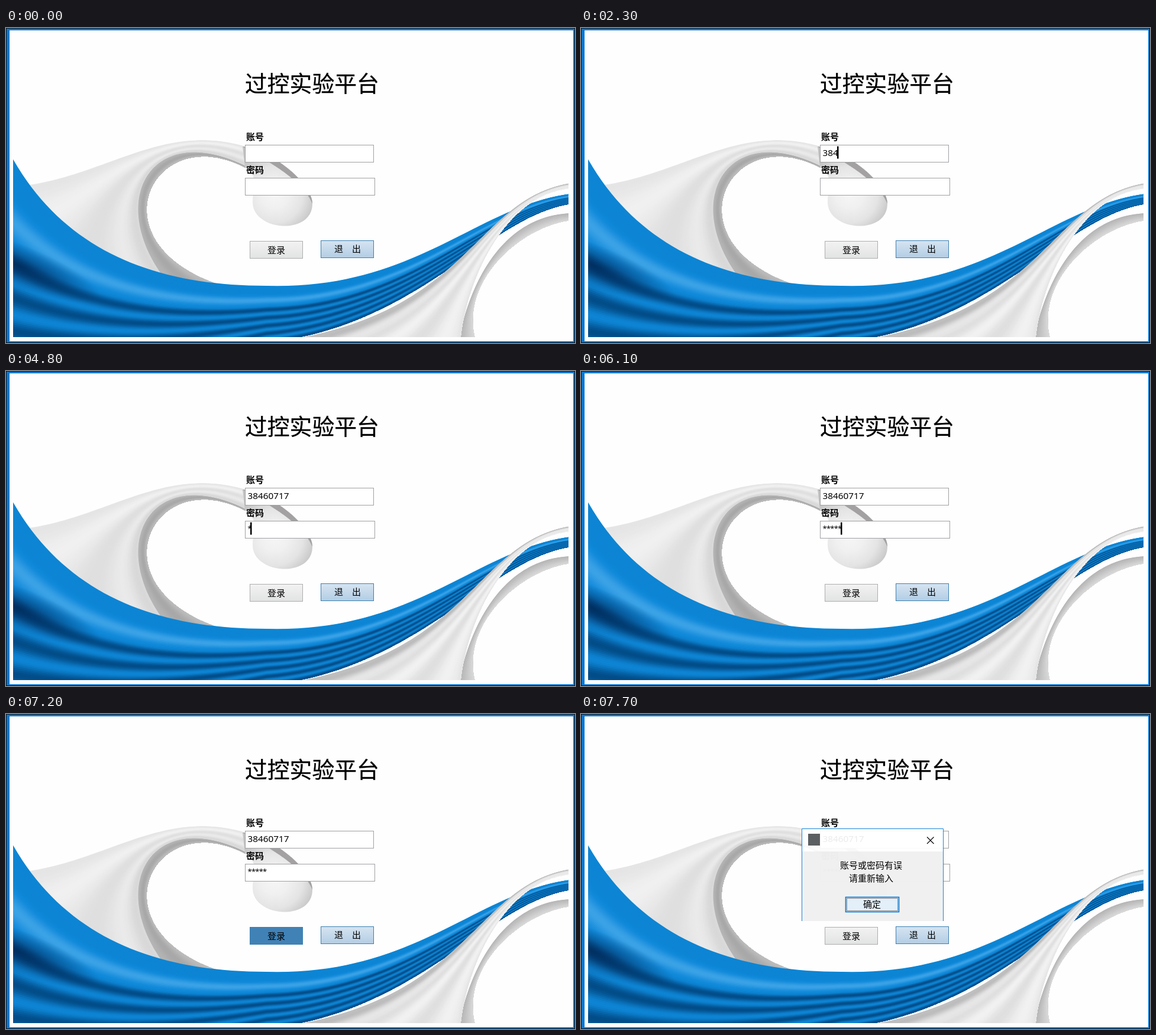
Write an HTML page with a canvas that moves like this. It is 962x534 px and loops after 8000 ms.

```html
<!DOCTYPE html>
<html lang="zh-CN">
<head>
<meta charset="utf-8">
<title>登录</title>
<style>
  html, body { margin: 0; width: 100%; height: 100%; overflow: hidden; background: #fff; }
  canvas, svg { position: absolute; left: 0; top: 0; width: 962px; height: 534px; }
  text { font: 15px "Noto Sans CJK SC", "Noto Sans CJK", sans-serif; fill: #000; }
  .title { font-size: 37.8px; font-weight: 300; stroke: #000; stroke-width: .3px; }
  .label { font-weight: 700; }
  .mid { text-anchor: middle; }
  .field { fill: #fff; stroke: #a0a0a4; }
  #account { font: 15.3px "Noto Sans", sans-serif; }
  #secret { font: 13px "Noto Sans", sans-serif; letter-spacing: -.76px; }
  .idle { fill: url(#grey); stroke: #adadad; }
  .hover { fill: url(#blue); stroke: #3c7fb1; }
  .pressed { fill: #4182b6; stroke: #3c7fb1; }
</style>
</head>
<body>
<canvas id="art" width="962" height="534"></canvas>
<svg viewBox="0 0 962 534">
  <defs>
    <linearGradient id="grey" x2="0" y2="1">
      <stop stop-color="#f2f2f2"/><stop offset="1" stop-color="#e1e3e2"/>
    </linearGradient>
    <linearGradient id="blue" x2="0" y2="1">
      <stop stop-color="#d6e4f1"/><stop offset="1" stop-color="#b2cde4"/>
    </linearGradient>
  </defs>
  <text class="title" x="404" y="108">过控实验平台</text>
  <text class="label" x="406" y="190">账号</text>
  <rect class="field" x="404.5" y="198.5" width="217" height="29"/>
  <text id="account" x="408.5" y="217"></text>
  <text class="label" x="406" y="246">密码</text>
  <rect class="field" x="404.5" y="254.5" width="219" height="29"/>
  <text id="secret" x="408.5" y="272"></text>
  <rect id="caret" width="2.5" height="21" opacity="0"/>
  <rect id="login" class="idle" x="412.5" y="361.5" width="89" height="29"/>
  <text class="mid" x="457" y="382">登录</text>
  <rect class="hover" x="532.5" y="360.5" width="89" height="29"/>
  <text class="mid" x="577.5" y="380">退　出</text>
  <g id="dialog" opacity="0">
    <rect x="373" y="194" width="240" height="39" fill="#fff" opacity=".92"/>
    <rect x="373" y="233" width="240" height="118" fill="#f0f0f0" opacity=".985"/>
    <path d="M373.5 351V194.5H612.5V351" fill="none" stroke="#1883d7"/>
    <rect x="384" y="203" width="20" height="20" fill="#5c5f61"/>
    <path d="M585 208.500l11.500 11.500m0-11.500l-11.500 11.500" stroke="#000" stroke-width="1.100"/>
    <text class="mid" x="490.500" y="262">账号或密码有误</text>
    <text class="mid" x="490.500" y="284">请重新输入</text>
    <rect x="447.500" y="310.500" width="90" height="25" fill="#e3eff9" stroke="#0078d7" stroke-width="1.600"/>
    <rect x="449.500" y="312.500" width="86" height="21" fill="none" stroke="#222" stroke-dasharray="1 1"/>
    <text class="mid" x="492" y="328">确定</text>
  </g>
</svg>
<script>
const $ = id => document.getElementById(id);
const ctx = $('art').getContext('2d');

// Points along a chain of cubic Béziers; every curve gets the same number of points.
function curve(...p) {
  const out = [], parts = (p.length - 2) / 6, total = 80;
  for (let i = 0; i <= total; i++) {
    const s = Math.min(parts - 1, Math.floor(i / total * parts));
    const u = i / total * parts - s, v = 1 - u;
    const at = k => {
      const q = s * 6 + k;
      return v * v * v * p[q] + 3 * u * v * (v * p[q + 2] + u * p[q + 4]) + u * u * u * p[q + 6];
    };
    out.push([at(0), at(1)]);
  }
  return out;
}

function fill(points, style) {
  ctx.beginPath();
  points.forEach(([x, y]) => ctx.lineTo(x, y));
  ctx.closePath();
  ctx.fillStyle = style;
  ctx.fill();
}

const mix = (a, b, u) => a.map((v, k) => v + (b[k] - v) * u);
const css = c => `rgb(${c.map(Math.round)})`;

// Ribbon between two edges, shaded across its width.
function ribbon(a, b, tone, strips = 90) {
  const back = [...b].reverse();
  for (let i = 0; i < strips; i++) {
    const t = i / strips;
    fill([...a.map((q, j) => mix(q, b[j], t)), ...back], css(tone(t)));
  }
}

const wave = (t, period) => Math.cos(t / period * 2 * Math.PI);

const grey = (base, slope, amp = 0, period = 1) => t =>
  Array(3).fill(base + slope * t + amp * wave(t, period));

// One broad highlight near the top edge, then evenly spaced dark folds.
function blue(t) {
  const v = t < .35
    ? .95 + .45 * Math.exp(-(((t - .25) / .06) ** 2))
    : .55 - .4 * wave(t - .42, .14);
  const base = [14, 136, 217];
  return v < 1 ? mix([0, 66, 122], base, v) : mix(base, [59, 162, 230], (v - 1) / .4);
}

// Grey on the shadow side, rippled white on the other.
const fold = t => grey(180 + 52 * Math.min(1, t / .4), 0, 9, .3)(t);

function radial(x, y, r, ...colors) {
  const g = ctx.createRadialGradient(x, y, 0, x, y, r);
  colors.forEach((c, i) => g.addColorStop(i / (colors.length - 1), c));
  return g;
}

function box(color, x, y, w, h) {
  ctx.fillStyle = color;
  ctx.fillRect(x, y, w, h);
}

function paint() {
  box('#101418', 0, 0, 962, 534);
  box('#0a78d0', 1, 1, 960, 532);
  box('#fefefe', 6, 4, 953, 527);
  ctx.beginPath();
  ctx.rect(12, 6, 939, 518);
  ctx.clip();

  // White swirl, its shaded inner rim and the drop at its tip
  const outer = curve(0, 270, 170, 262, 270, 140, 440, 214);
  const rim = curve(315, 475, 150, 330, 225, 145, 405, 234);
  const hole = curve(395, 445, 135, 385, 240, 150, 405, 237);
  ribbon(outer, rim, grey(236, -14, -7, .45));
  ribbon(rim, hole, grey(172, 8, 8), 30);

  const crest = [400, 201, 455, 210, 518, 265, 518, 298];
  const drop = curve(...crest, 518, 352, 417, 345, 417, 295, 417, 270, 430, 255, 404, 236);
  fill(drop, radial(454, 282, 72, '#f6f6f6', '#f0f0f0', '#e4e4e4', '#c4c4c4'));
  fill([...curve(...crest), ...curve(518, 298, 500, 255, 440, 225, 400, 201)], '#a3a1a1');

  // Grey ribbon at the back
  ribbon(curve(955, 314, 840, 318, 785, 430, 765, 530),
    curve(955, 326, 870, 336, 765, 430, 794, 530), grey(180, 38), 40);

  // Blue ribbon with a deep shadow at its left end
  ribbon(curve(0, 200, 85, 370, 240, 437, 440, 437, 690, 445, 800, 300, 955, 281),
    curve(-20, 640, 150, 610, 300, 570, 440, 533, 700, 505, 815, 318, 955, 298), blue, 120);
  ctx.save();
  ctx.translate(20, 402);
  ctx.rotate(.38);
  ctx.scale(1, .24);
  box(radial(0, 0, 150, 'rgba(0,38,84,.75)', 'rgba(0,38,84,0)'), -150, -150, 300, 300);
  ctx.restore();

  // White ribbon in front
  ribbon(curve(955, 263, 790, 290, 790, 480, 470, 530),
    curve(955, 272, 845, 280, 778, 425, 768, 530), fold);
}

const LOOP = 8000;
const USER = '38460717';
const userKeys = [1000, 1500, 2300, 2400, 2800, 3000, 3300, 3800];
const secretKeys = [4800, 5100, 5600, 5900, 6100];
const SHOW = 100, TAB = 3900, HOVER = 6600, PRESS = 7200, POPUP = 7500;
const typed = (keys, t) => keys.filter(k => t >= k).length;

function draw(t) {
  const n = typed(userKeys, t), m = typed(secretKeys, t);
  $('account').textContent = USER.slice(0, n);
  $('secret').textContent = '*'.repeat(m);

  const inUser = t < TAB;
  const caret = $('caret');
  caret.setAttribute('x', Math.max(409, Math.round(407 + (inUser ? n * 8.75 : m * 6.4))));
  caret.setAttribute('y', inUser ? 200.5 : 256.5);
  caret.setAttribute('opacity', t >= SHOW && t < PRESS ? 1 : 0);

  const state = t < HOVER || t >= POPUP ? 'idle' : t < PRESS ? 'hover' : 'pressed';
  $('login').setAttribute('class', state);

  // The dialog fades in over three steps.
  const step = Math.floor((t - POPUP) / 100) + 1;
  $('dialog').setAttribute('opacity', Math.max(0, Math.min(1, step / 3)));
}

const start = performance.now();
function tick() {
  draw((performance.now() - start) % LOOP);
  requestAnimationFrame(tick);
}
paint();
tick();
</script>
</body>
</html>
```
